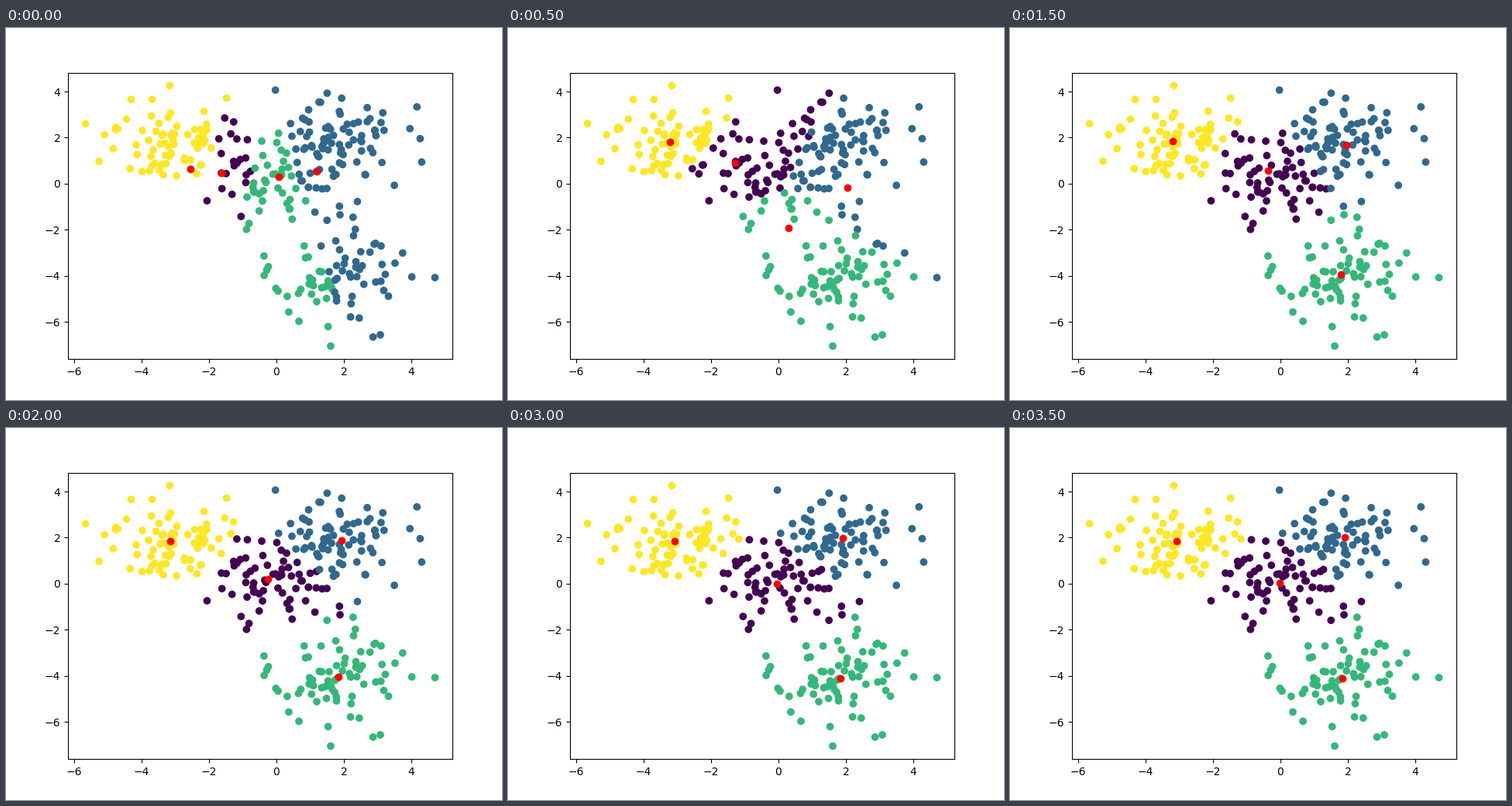
A matplotlib script for the animation above (4000 ms loop, 640 by 480 pixels).

```python
import numpy as np
import matplotlib.pyplot as plt
from matplotlib.animation import FuncAnimation

STEPS = 8
BLOBS = [(0, 0), (2, 2), (-3, 2), (2, -4)]
SEEDS = [(-1.63, 0.46), (1.2, 0.53), (0.07, 0.30), (-2.55, 0.65)]


def make_points(per_blob=75):
    rng = np.random.RandomState(0)
    pts = np.vstack([rng.normal(c, 1, (per_blob, 2)) for c in BLOBS])
    order = np.arange(len(pts))
    rng.shuffle(order)
    return pts[order]


def distances(a, b):
    return np.linalg.norm(a[:, None] - b[None], axis=2)


def lloyd(pts, centers, steps):
    """Return (centers, labels) for each k-means iteration."""
    history = []
    for _ in range(steps):
        labels = distances(pts, centers).argmin(axis=1)
        history.append((centers, labels))
        centers = np.array([pts[labels == k].mean(axis=0)
                            for k in range(len(centers))])
    return history


points = make_points()
# Each starting center is the data point closest to its seed.
start = points[distances(np.array(SEEDS), points).argmin(axis=1)]
history = lloyd(points, start, STEPS)

fig, ax = plt.subplots(figsize=(6.4, 4.8), dpi=100)
dots = ax.scatter(points[:, 0], points[:, 1], c=history[0][1],
                  cmap="viridis", vmin=0, vmax=3)
marks = ax.scatter(start[:, 0], start[:, 1], c="r")


def draw(i):
    centers, labels = history[i]
    dots.set_array(labels)
    marks.set_offsets(centers)
    return dots, marks


anim = FuncAnimation(fig, draw, frames=STEPS, interval=500,
                     repeat=True, repeat_delay=0)
plt.show()
```
